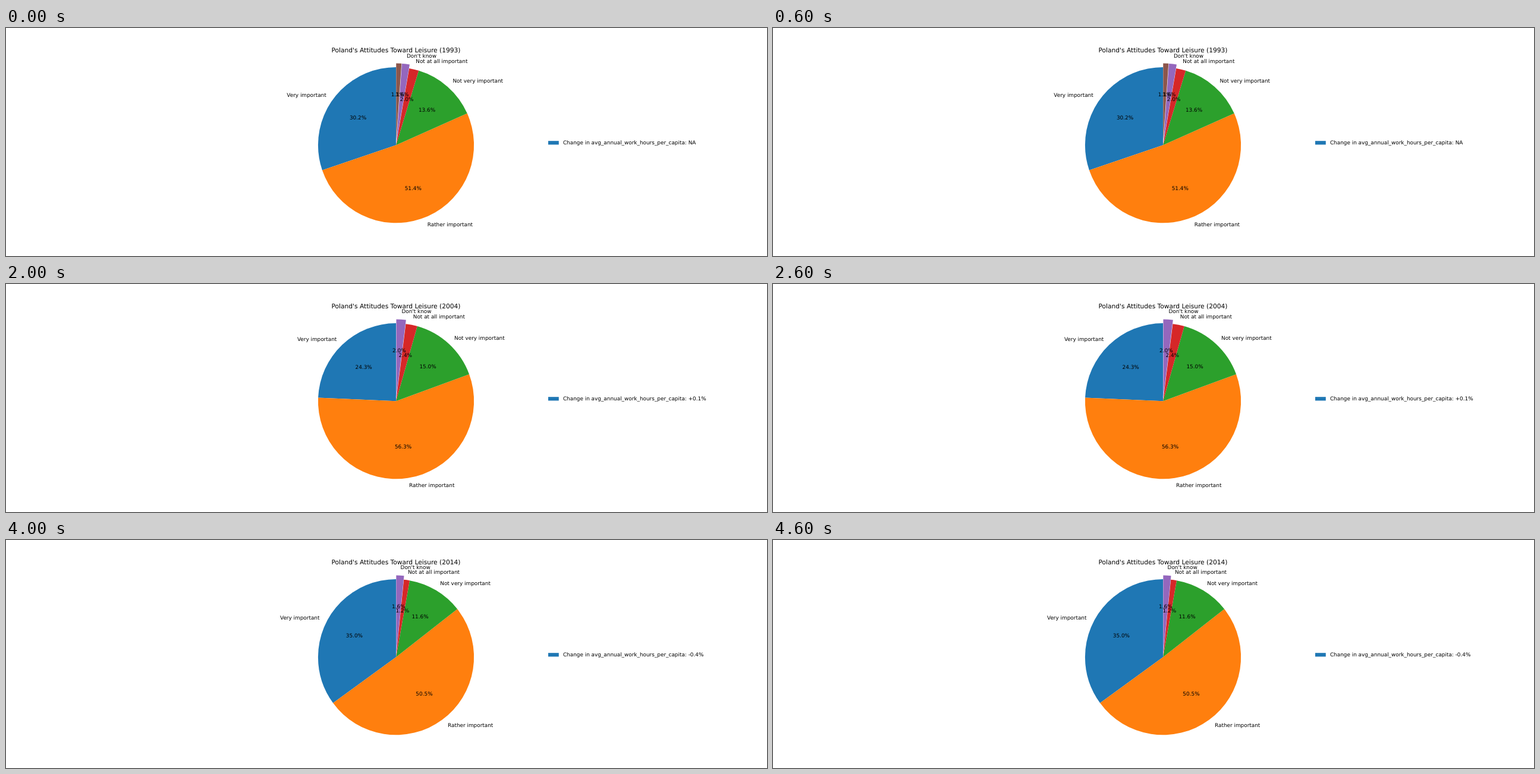
Animation of 1280 by 384 pixels, one loop 5 s. Source, as an HTML page with a canvas:

```html
<!DOCTYPE html>
<html lang="en">
<head>
<meta charset="utf-8">
<title>Attitudes toward leisure</title>
<style>
  html, body { margin: 0; width: 100%; height: 100%; overflow: hidden; background: #fff; }
  canvas { display: block; }
</style>
</head>
<body>
<canvas id="stage" width="1280" height="384"></canvas>
<script>
const ctx = document.getElementById('stage').getContext('2d');

const CENTER = { x: 656, y: 197.2 };
const RADIUS = 131.1;
const FONT_SIZE = 8.889;
const STEP_MS = 1000;

const CATEGORIES = [
  { label: 'Very important', color: '#1f77b4', explode: 0 },
  { label: 'Rather important', color: '#ff7f0e', explode: 0 },
  { label: 'Not very important', color: '#2ca02c', explode: 0 },
  { label: 'Not at all important', color: '#d62728', explode: 0 },
  { label: "Don't know", color: '#9467bd', explode: 0.05 },
  { label: '', color: '#8c564b', explode: 0.05 },
];

const SURVEYS = [
  { year: 1993, change: 'NA', shares: [30.2, 51.4, 13.6, 2.0, 1.6, 1.1] },
  { year: 1998, change: '+0.5%', shares: [23.0, 54.9, 16.7, 2.4, 3.0] },
  { year: 2004, change: '+0.1%', shares: [24.3, 56.3, 15.0, 2.4, 2.0] },
  { year: 2010, change: '-1.7%', shares: [34.0, 50.5, 12.5, 1.4, 1.4, 0.2] },
  { year: 2014, change: '-0.4%', shares: [35.0, 50.5, 11.6, 1.2, 1.6] },
];

function write(text, x, baseline, align = 'left', size = FONT_SIZE) {
  ctx.font = `${size}px "DejaVu Sans", sans-serif`;
  ctx.textRendering = 'geometricPrecision';
  ctx.textAlign = align;
  ctx.fillStyle = '#000';
  ctx.fillText(text, x, baseline);
}

// Point on the bisector of a wedge, at a distance given in radii.
function along(angle, distance) {
  return {
    x: CENTER.x + RADIUS * distance * Math.cos(angle),
    y: CENTER.y + RADIUS * distance * Math.sin(angle),
  };
}

// Wedges run counterclockwise from twelve o'clock.
function layOut(shares) {
  const total = shares.reduce((sum, share) => sum + share, 0);
  let start = -Math.PI / 2;
  return shares.map((share, i) => {
    const end = start - share / total * 2 * Math.PI;
    const wedge = { ...CATEGORIES[i], share, start, end, middle: (start + end) / 2 };
    start = end;
    return wedge;
  });
}

function drawWedge({ color, explode, start, end, middle }) {
  const tip = along(middle, explode);
  ctx.fillStyle = color;
  ctx.beginPath();
  ctx.moveTo(tip.x, tip.y);
  ctx.arc(tip.x, tip.y, RADIUS, start, end, true);
  ctx.fill();
}

function drawWedgeText({ label, share, explode, middle }) {
  const drop = 2.5; // from the text's middle to its baseline
  const outer = along(middle, 1.1 + explode);
  write(label, outer.x, outer.y + drop, outer.x > CENTER.x ? 'left' : 'right');
  if (share >= 1) {
    const inner = along(middle, 0.6 + explode);
    write(share.toFixed(1) + '%', inner.x, inner.y + drop, 'center');
  }
}

function drawChart({ year, change, shares }) {
  ctx.fillStyle = '#fff';
  ctx.fillRect(0, 0, 1280, 384);

  const wedges = layOut(shares);
  wedges.forEach(drawWedge);
  wedges.forEach(drawWedgeText);
  write(`Poland's Attitudes Toward Leisure (${year})`, CENTER.x, 40.8, 'center', 10.667);

  ctx.fillStyle = CATEGORIES[0].color;
  ctx.fillRect(912, 190.2, 17.78, 6.22);
  write(`Change in avg_annual_work_hours_per_capita: ${change}`, 936.9, 196.4);
}

function tick() {
  drawChart(SURVEYS[Math.floor(performance.now() / STEP_MS) % SURVEYS.length]);
  requestAnimationFrame(tick);
}
tick();
</script>
</body>
</html>
```
